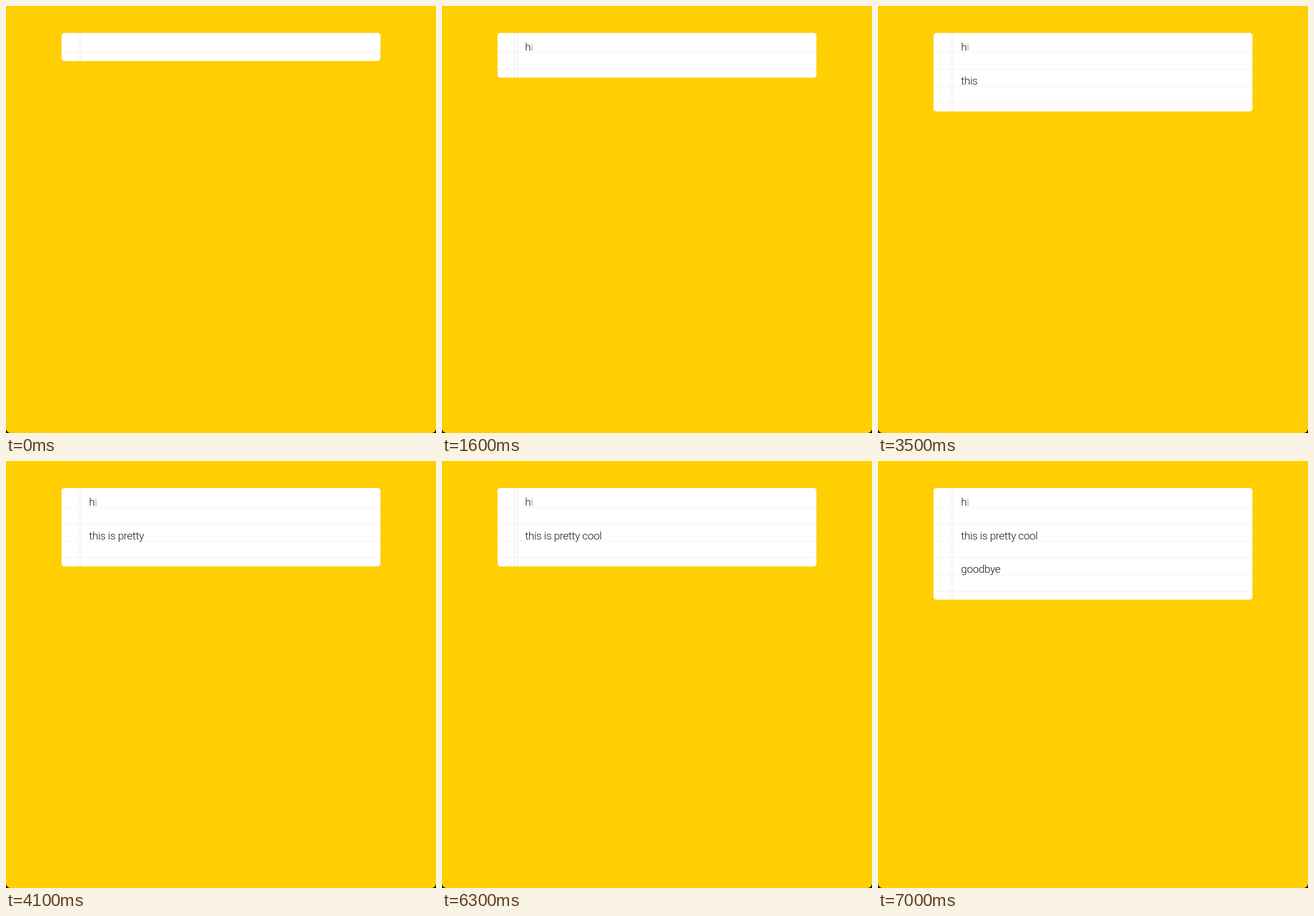
An HTML page with a canvas that plays this animation: 751 by 745 pixels, repeating every 7100 ms.

```html
<!DOCTYPE html>
<html lang="en">
<head>
<meta charset="utf-8">
<title>Growing notepad</title>
<style>
  html, body { margin: 0; width: 100%; height: 100%; overflow: hidden; background: #000; }
  canvas { display: block; }
</style>
</head>
<body>
<canvas id="stage" width="751" height="745"></canvas>
<script>
const ctx = document.getElementById('stage').getContext('2d');
const LOOP = 7100;
const STEP = 100;
const ROW = 29.3;
const CARD = { x: 97, y: 47, width: 557, radius: 5 };

// Each burst types from `from` letters to the end of `text` in equal steps.
const bursts = [
  { line: 0, start: 1500, end: 1600, from: 1, text: 'hi' },
  { line: 1, start: 3500, end: 4100, from: 4, text: 'this is pretty' },
  { line: 1, start: 4400, end: 4600, from: 16, text: 'this is pretty cool' },
  { line: 2, start: 6400, end: 6600, from: 4, text: 'goodbye' }
];

function typedLines(time) {
  const lines = [];
  for (const { line, start, end, from, text } of bursts) {
    if (time < start) break;
    const progress = Math.min(1, (time - start) / (end - start));
    lines[line] = text.slice(0, Math.round(from + (text.length - from) * progress));
  }
  return lines;
}

function roundedRect(x, y, width, height, radii, color) {
  ctx.fillStyle = color;
  ctx.beginPath();
  ctx.roundRect(x, y, width, height, radii);
  ctx.fill();
}

function drawCard(bottom) {
  const { x, y, width, radius } = CARD;
  roundedRect(x, y, width, bottom - y, radius, '#fff');
  ctx.fillStyle = '#f1f1f1';
  for (let row = 0; ; row++) {
    const ruleY = Math.round(80.4 + row * ROW);
    if (ruleY >= bottom) break;
    ctx.fillRect(x, ruleY, width, 1);
  }
  ctx.fillStyle = '#e9e9e9';
  for (const marginX of [126, 131]) ctx.fillRect(marginX, y, 1, bottom - y);
}

function drawText(lines) {
  ctx.font = '300 19px Roboto, "Liberation Sans", sans-serif';
  ctx.letterSpacing = '-0.4px';
  lines.forEach((text, line) => {
    const y = 78 + line * 2 * ROW;
    ctx.fillStyle = '#1c1c1c';
    if (line > 0) return ctx.fillText(text, 145, y);
    // The greeting ends in a golden letter.
    ctx.fillText(text[0], 145, y);
    ctx.fillStyle = '#b0912e';
    ctx.fillText(text.slice(1), 145 + ctx.measureText(text[0]).width, y);
  });
}

function draw(now) {
  const time = Math.floor((now % LOOP) / STEP) * STEP;
  const lines = typedLines(time);
  const extraRows = lines.length ? lines.length * 2 - 1 : 0;

  ctx.fillStyle = '#000';
  ctx.fillRect(0, 0, 751, 745);
  roundedRect(0, 0, 751, 745, [0, 0, 8, 8], '#ffcf02');
  drawCard(Math.round(95.9 + extraRows * ROW));
  drawText(lines);
}

const startTime = performance.now();
function tick() {
  draw(performance.now() - startTime);
  requestAnimationFrame(tick);
}
tick();
</script>
</body>
</html>
```
